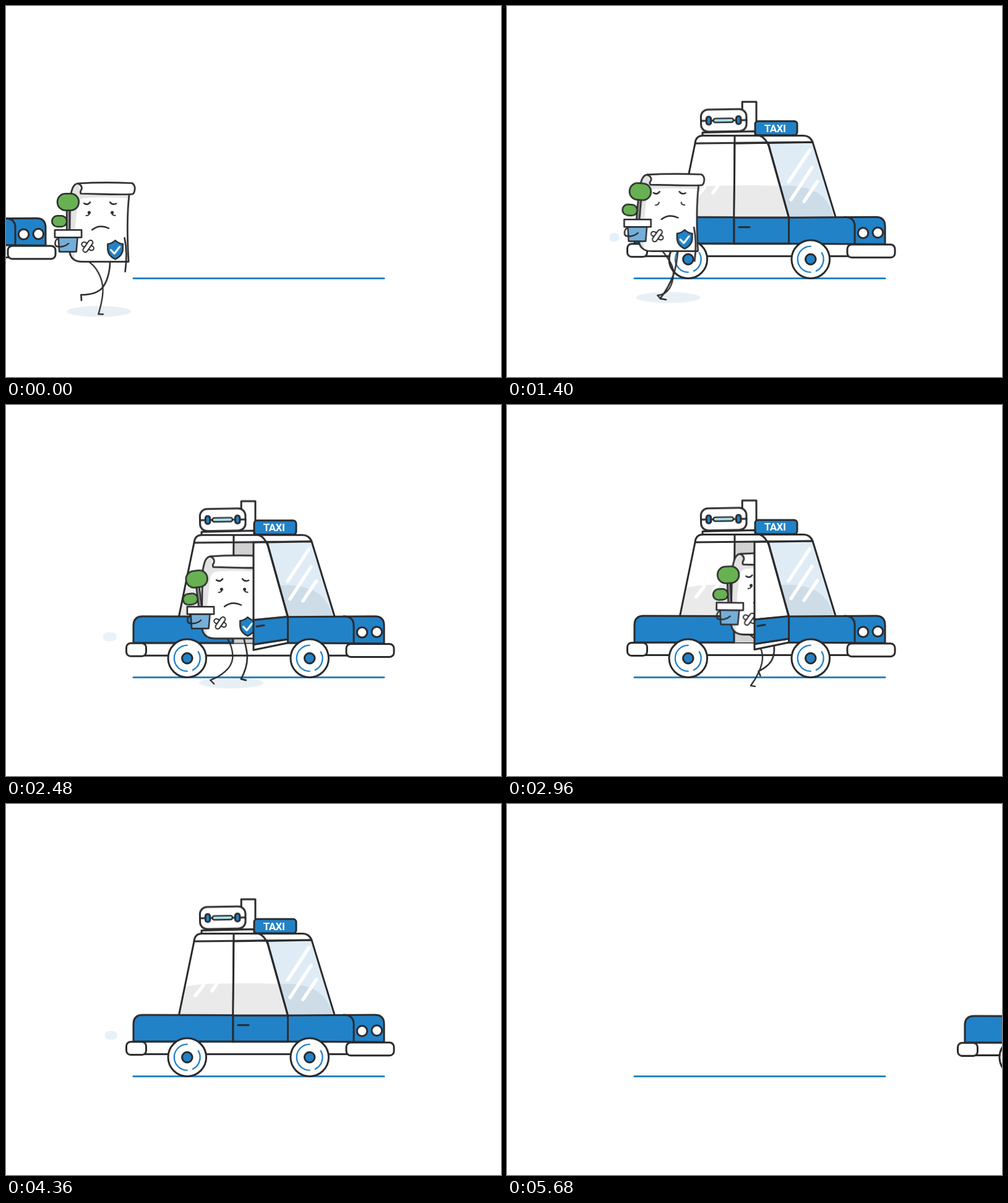
Write an HTML page that moves like this. It is 800 px wide and 600 px high and loops after 5.76 s.

```html
<!DOCTYPE html>
<html lang="en">
<head>
<meta charset="utf-8">
<title>Taxi ride</title>
<style>
@property --x { syntax: "<number>"; inherits: true; initial-value: 0; }

html, body { margin: 0; width: 100%; height: 100%; overflow: hidden; background: #fff; }
#stage {
  --loop: 5760ms; --step: 576ms;
  position: relative; width: 800px; height: 600px; overflow: hidden;
  animation: drive var(--loop) infinite;
}
svg { position: absolute; left: 0; top: 0; width: 800px; height: 600px; }
path, rect, circle, line { stroke-linecap: round; stroke-linejoin: round; }

.ink { stroke: #2b2b2d; stroke-width: 3; fill: none; }
.thin { stroke-width: 2.4; }
.white { fill: #fff; }
.blue { fill: #2182c8; }
.green { fill: #68b152; }
.glint { stroke: #fff; stroke-width: 5.5; fill: none; }
.sign { font: 700 17px Roboto, "Open Sans", sans-serif; font-stretch: 75%; fill: #fff; text-anchor: middle; letter-spacing: -.5px; }

/* Car */
.car { transform: translateX(calc(var(--x) * 1px)); }
.spin { transform: rotate(calc(var(--x) * 1.848deg)); }
.bob { animation: bob calc(var(--loop) / 22) ease-in-out infinite alternate; }
.case { animation: case var(--loop) linear infinite; }
.post { animation: post var(--loop) linear infinite; }
.puff { fill: #e4f1fa; animation: puff 960ms linear infinite; }
.glass { animation: glass var(--loop) ease-in-out infinite; }
.panel { animation: panel var(--loop) ease-in-out infinite; }
.sill { animation: sill var(--loop) ease-in-out infinite; }
.handle { animation: handle var(--loop) ease-in-out infinite; }
.seat { animation: seat var(--loop) linear infinite; }

@keyframes drive {
  0% { --x: -547; animation-timing-function: cubic-bezier(.333, 0, .667, .333); }
  7.292% { --x: -273.5; animation-timing-function: cubic-bezier(.333, .667, .667, 1); }
  14.583% { --x: 0; }
  81.597% { --x: 0; animation-timing-function: cubic-bezier(.333, 0, .667, .333); }
  91.667% { --x: 280.5; animation-timing-function: cubic-bezier(.333, .509, .667, .842); }
  98.611%, 100% { --x: 534; }
}
@keyframes bob { from { transform: translateY(2.3px); } to { transform: translateY(-.6px); } }
@keyframes case {
  0%, 12.5% { transform: translateY(2px); }
  16%, 75%, 100% { transform: none; }
  24.3%, 43% { transform: translateY(1px); }
}
@keyframes post {
  0%, 12.5% { transform: translateY(-1px); }
  24.3%, 43% { transform: translateY(.8px); }
  60%, 100% { transform: none; }
}
@keyframes puff {
  0%, 20% { x: 184px; width: 4px; opacity: 0; }
  30% { x: 176px; width: 10px; opacity: 1; }
  46% { x: 165px; width: 16.5px; opacity: 1; }
  58% { x: 157px; width: 22px; opacity: .9; }
  66% { x: 153px; width: 23px; opacity: .7; }
  70%, 100% { x: 153px; width: 23px; opacity: 0; }
}
@keyframes glass {
  0%, 29.5%, 68%, 100% { d: path("M368 222 L422 221 L455.5 342 L367 342 Z"); }
  34.7%, 63.2% { d: path("M400 221.5 L422 221 L455.5 342 L400 347 Z"); }
}
@keyframes panel {
  0%, 29.5%, 68%, 100% { d: path("M367 342 L455.5 342 L455.5 384 L367 384 Z"); }
  34.7%, 63.2% { d: path("M400 347 L455.5 341.5 L455.5 378 L400 386.5 Z"); }
}
@keyframes sill {
  0%, 29.5%, 68%, 100% { d: path("M367 384 L455.5 384 L455.5 384 L367 384 Z"); }
  34.7%, 63.2% { d: path("M400 386.5 L455.5 378 L455.5 384 L400 395.5 Z"); }
}
@keyframes handle {
  0%, 29.5%, 68%, 100% { d: path("M375 357.5 L392 357.5"); }
  34.7%, 63.2% { d: path("M405 357.5 L417 355.5"); }
}
@keyframes seat { 0%, 29.5%, 68%, 100% { opacity: 1; } 31%, 66% { opacity: 0; } }

/* Walker */
#back { z-index: 0; }
#front { z-index: 2; }
#hero { clip-path: inset(0 350px 0 0); animation: layer var(--loop) step-end infinite; }
.walk { animation: walk var(--loop) linear infinite; }
.lean { transform-origin: 146px 345px; animation: lean var(--loop) ease-in-out infinite; }
.paper { transform-origin: 150px 414px; animation: stretch calc(var(--step) / 2) linear infinite; }
.plant { transform-origin: 100.5px 368px; animation: sway var(--loop) ease-in-out infinite; }
.shade { fill: #e9f0f5; animation: shade var(--loop) linear infinite; }
.legs { animation: legs var(--loop) step-end infinite; }
.last { animation: last var(--loop) step-end infinite; }
.legA { stroke-width: 2.3; animation: legA var(--step) linear infinite; }
.legB { stroke-width: 2.6; animation: legB var(--step) linear infinite; }
.pupil { animation: blink var(--loop) step-end infinite; }

@keyframes layer { 0% { z-index: 3; visibility: visible; } 28% { z-index: 1; } 68% { z-index: 1; visibility: hidden; } }
@keyframes walk {
  0% { transform: none; }
  12.5% { transform: translate(51.5px, -10px); }
  24.306% { transform: translate(110.5px, -17px); }
  43.056% { transform: translate(214px, -36px); }
  59.722% { transform: translate(306px, -48px); }
  68%, 100% { transform: translate(355px, -52px); }
}
@keyframes lean { 0%, 50% { transform: none; } 59.722%, 100% { transform: rotate(14deg); } }
@keyframes stretch {
  0%, 100% { transform: none; }
  50% { transform: scaleY(1.055); }
  61% { transform: scaleY(1.05); }
  86% { transform: scaleY(.977); }
}
@keyframes sway {
  0%, 59.722%, 100% { transform: none; }
  12.5%, 24.306% { transform: rotate(5deg); }
  18% { transform: rotate(-3deg); }
  33% { transform: rotate(4deg); }
  43.056% { transform: rotate(-7deg); }
}
@keyframes shade {
  0% { transform: none; opacity: 1; }
  12.5% { transform: translate(51.5px, -10.5px); }
  24.306% { transform: translate(110.5px, -22.5px); }
  43.056% { transform: translate(214px, -44.5px); opacity: 1; }
  52%, 100% { transform: translate(262px, -54px); opacity: 0; }
}
@keyframes legs { 0% { opacity: 1; } 56% { opacity: 0; } }
@keyframes last { 0% { opacity: 0; } 56% { opacity: 1; } 62% { opacity: 0; } }
@keyframes blink { 0% { opacity: 1; } 23.5% { opacity: 0; } 25.2% { opacity: 1; } }
@keyframes legA {
  0%, 100% { d: path("M131 412 C146 420 156 440 156.5 458 C157 470 153 486 149.5 498.5 L157 498.5"); }
  25% { d: path("M129 412 C142 420 150 432 150 444 C150 458 138 478 121.5 494 L128.5 496"); }
  30.6% { d: path("M143 412 C150 424 153 436 152 446 C150 462 134 474 116 481 L122 487"); }
  43% { d: path("M139.5 412 C150 425 158 436 158.5 448 C158 468 150 484 132.5 485 L138 491"); }
  75% { d: path("M131 412 C141 424 146 436 146 446 C146 458 150 468 160 477 L165 483"); }
}
@keyframes legB {
  0%, 100% { d: path("M168 412 C168 430 163 446 156 455 C148 465 135 467 121 467 L121.5 476"); }
  25% { d: path("M166 412 C176 424 180.5 436 180.5 446 C180.5 458 174 468 166 477 L171 483"); }
  30.6% { d: path("M170 412 C173 424 176 434 176 444 C176 456 171 470 166 479 L174 481"); }
  43% { d: path("M165.5 412 C164 430 162 440 159 450 C153 466 145 480 137 490 L146.5 492"); }
  75% { d: path("M166 412 C172 420 172 432 170 444 C166 458 142 478 124 494 L131 496"); }
}
</style>
</head>
<body>
<div id="stage">

<svg id="back" viewBox="0 0 800 600">
  <defs>
    <g id="wheel">
      <circle r="30.8" class="ink white"/>
      <path d="M0 -21 A21 21 0 0 0 0 21 M18 -10.5 A21 21 0 0 1 9 19" fill="none" stroke="#2182c8" stroke-width="2.3"/>
      <circle r="8.3" class="ink blue"/>
    </g>
  </defs>
  <ellipse class="shade" cx="150" cy="494" rx="52" ry="9"/>
  <path d="M206 440.5 H611" stroke="#2b83c0" stroke-width="3"/>
  <g class="car">
    <g class="bob">
      <rect class="puff" x="184" y="367" width="4" height="14" rx="7"/>
      <path class="ink white" d="M212 384 H560 V404.5 H216"/>
      <g class="post"><rect class="ink white" x="380.2" y="154" width="22.8" height="49"/></g>
      <path class="ink white" d="M316 209 V204.5 L401 202.5 V209"/>
      <g class="case">
        <g transform="rotate(-1 350 184)">
          <rect class="ink white" x="313.5" y="166" width="73.5" height="35.8" rx="11.5"/>
          <path class="ink" d="M314 184 H387"/>
          <rect class="ink blue" x="322.3" y="177.5" width="7.4" height="12.8" rx="3.4"/>
          <rect class="ink blue" x="370.5" y="177.5" width="7.4" height="12.8" rx="3.4"/>
          <rect class="ink thin" x="333.5" y="180.6" width="32.5" height="6.4" rx="3.2" fill="#fff" style="fill:#a9e2ee"/>
        </g>
      </g>
      <path class="white" d="M304 222 L494 220 L531 341 H279.5 Z"/>
      <path fill="#eaeaea" d="M289 296 Q305 290 370 290 V341 H280 Z"/>
      <path class="glint" d="M319 293 L306 310 M340.500 291 L333 302"/>
      <path fill="#d1d1d1" d="M368 222 H422 L456 342 V384 H367 Z"/>
      <path class="ink white" d="M304 222 Q305 209.400 317 209.400 H479 Q490 209.400 494 220 Z"/>
      <path class="ink" d="M279.5 341 L304 222 M368 209.4 L367 342"/>
      <path class="ink blue" d="M206 384 V356 Q206 341 221 341 L367 341.500 V384 Z"/>
      <rect class="ink white" x="194.500" y="384.500" width="32" height="21" rx="7"/>
    </g>
    <g transform="translate(292.8 409.6)"><use href="#wheel" class="spin"/></g>
  </g>
</svg>

<svg id="hero" viewBox="0 0 800 600">
  <path class="ink last" style="stroke-width:2.4" d="M443 376 C444 398 441 417 431 422 L441 427.500"/>
  <g class="walk">
    <g class="legs">
      <path class="ink legA" d="M131 412 L149 498"/>
      <path class="ink legB" d="M168 412 L121 467"/>
    </g>
    <g class="lean">
      <g class="paper">
        <path fill="#e3e3e3" d="M117 287 C108 287 106 298 104 308 Q102.5 340 102.500 396 Q104 413.500 123 413.500 H198 C196 380 195 340 199 305 L121 303 Z"/>
        <path class="white" d="M111 413 C109 380 113 340 116 320 Q117.500 310.500 130 310 Q165 308 198.500 311 C196 340 196 380 198 413 Z"/>
        <path class="ink thin" style="stroke-width:2.7" d="M117 287 C108 287 106 298 104 308 Q102.5 340 102.500 396 Q104 413.500 123 413.500 H198 C196 380 195 340 199 305"/>
        <path class="ink white" style="stroke-width:2.7" d="M116 287 C140 285.500 180 285.500 203.500 286.500 Q209 290 208 297 Q207 304.500 203 304.500 C170 305.500 145 303.500 121 303.500 Q119 300.500 122 296.500 Q123.500 290 116 287 Z"/>
      </g>
      <g class="ink thin">
        <path d="M126 319 Q131.500 323 136 317.200 M168 317.200 Q172 322.500 178 319.500"/>
        <path style="stroke-width:2" d="M135 334.500 Q134.500 339 129.500 339 M171 334.500 Q171.500 339 176.500 338.800"/>
        <path d="M139 362 Q151 352.500 166 359.500"/>
        <path d="M191.500 375 C195 392 195 412 192.500 429.500" style="stroke-width:2.7"/>
      </g>
      <g class="pupil" fill="#2b2b2d"><circle cx="134.300" cy="334" r="2.500"/><circle cx="171.500" cy="334" r="2.500"/></g>
      <g class="ink white" style="stroke-width:2;fill:#fff">
        <rect x="-10.500" y="-3.700" width="21" height="7.400" rx="3.700" transform="translate(132 388.500) rotate(27)"/>
        <rect x="-11" y="-3.700" width="22" height="7.400" rx="3.700" transform="translate(132.300 388.500) rotate(-55)"/>
      </g>
      <path class="ink blue thin" d="M176.500 379 Q181.500 384 188.800 385 V392 C188.800 401 183 406.500 176.500 409.500 C170 406.500 164.200 401 164.200 392 V385 Q171.500 384 176.500 379 Z"/>
      <path d="M169.500 394.500 L175 400.500 L183.500 389.500" fill="none" stroke="#fff" stroke-width="3"/>
      <g class="plant">
        <rect class="ink thin" style="fill:#8f8f8f" x="98" y="328" width="5" height="36"/>
        <rect class="ink green" style="stroke-width:2.600" x="83" y="303.500" width="34.600" height="27" rx="13"/>
        <rect class="ink green" style="stroke-width:2.600" x="74.200" y="339.300" width="24" height="17.700" rx="8.800"/>
      </g>
      <path class="ink thin" style="fill:#74afd9" d="M84.500 374 H115.500 L113.500 397.500 H86 Z"/>
      <rect class="ink white" style="stroke-width:2.600" x="78.800" y="362.300" width="43.200" height="12"/>
      <path class="ink thin" d="M84 376 C79 378 78 386 81 388.500 C88 390.500 96 389 101 384"/>
    </g>
  </g>
</svg>

<svg id="front" viewBox="0 0 800 600">
  <g class="car">
    <g class="bob">
      <path fill="#dfecf6" d="M422 221.500 L494 220 L531 341 H455.500 Z"/>
      <path fill="#cddce6" d="M441.500 291 C482 289 515 297 527 338 L528 341 H455.500 Z"/>
      <path class="glint" d="M489.500 232.500 L455 284.500 M493 261 L459 313 M501.500 284 L480 316"/>
      <path class="ink" d="M422 221.300 L494 220 L531 341"/>
      <rect class="ink blue" x="401" y="186" width="68" height="22.800" rx="5"/>
      <text class="sign" x="433" y="203.500">TAXI</text>
      <path class="ink blue" d="M455.500 342 L596 341 Q611 341 611 356 V385 L455.500 384 Z"/>
      <path class="ink" d="M546 341 Q562 341.500 562 356 V385"/>
      <circle class="ink white" cx="575.500" cy="367" r="8.300"/>
      <circle class="ink white" cx="599.300" cy="366.300" r="8.300"/>
      <rect class="ink white" x="550" y="385.700" width="77" height="21" rx="7"/>
      <path class="ink white sill" d="M367 384 H455.500"/>
      <path class="ink white glass" d="M368 222 L422 221 L455.500 342 L367 342 Z"/>
      <path class="seat" fill="#eaeaea" d="M369.300 290 Q405 289 439.500 290.800 L453.500 340.500 H368.500 Z"/>
      <path class="ink blue panel" d="M367 342 L455.500 342 L455.500 384 L367 384 Z"/>
      <path class="ink handle" d="M375 357.500 L392 357.500"/>
      <path class="ink" d="M408 209.400 Q418 213 423 226 L455.500 342"/>
    </g>
    <g transform="translate(490.700 409.600)"><use href="#wheel" class="spin"/></g>
  </g>
</svg>

</div>
</body>
</html>
```
